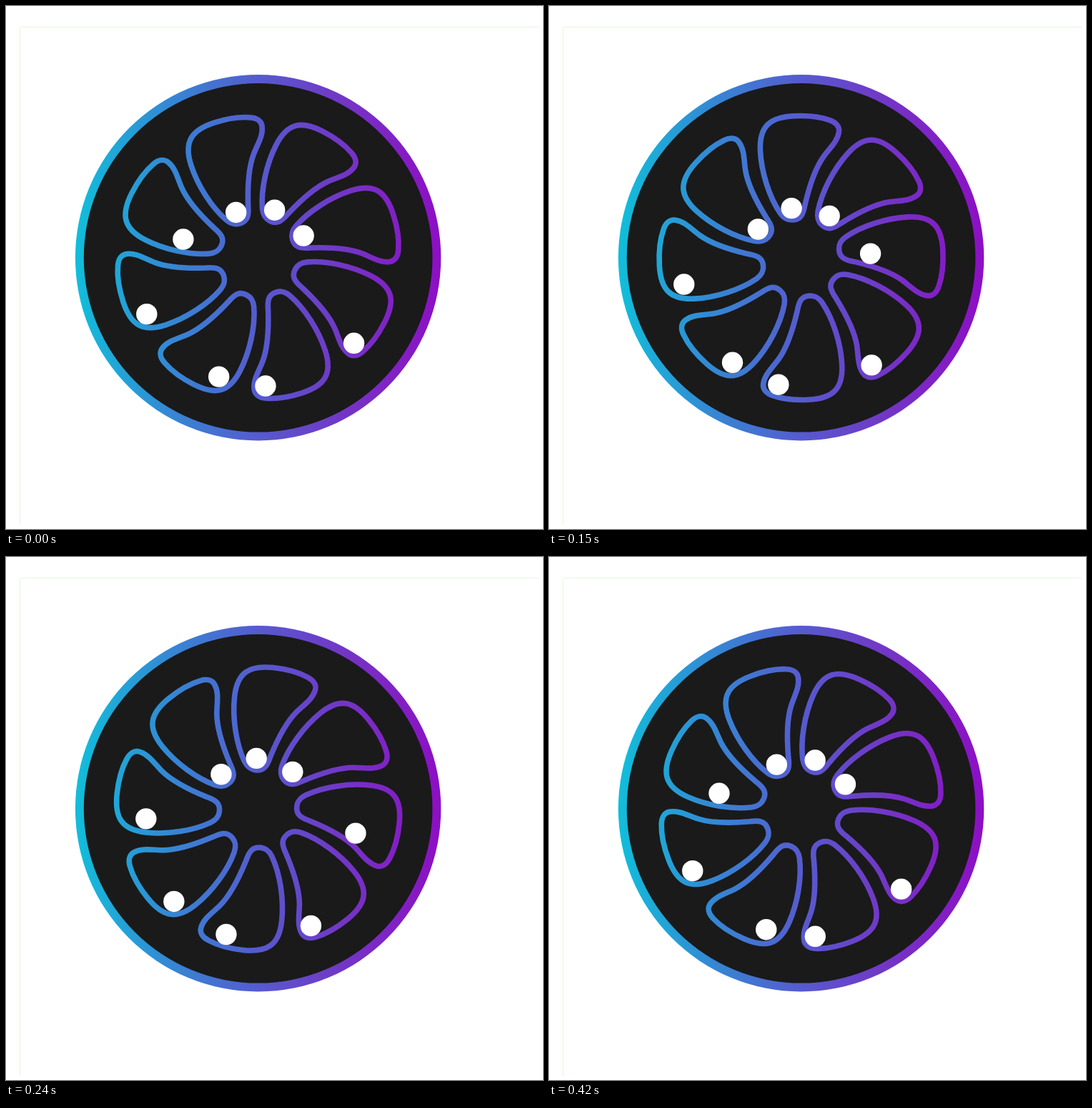
Animation, 751 px wide and 731 px high, one loop 0.45 s. Source, as an HTML page with a canvas:

```html
<!DOCTYPE html>
<html lang="en">
<head>
<meta charset="utf-8">
<title>Wheel</title>
<style>
  html, body { margin: 0; width: 100%; height: 100%; overflow: hidden; background: #fff; }
  canvas { display: block; }
</style>
</head>
<body>
<canvas id="stage" width="751" height="731"></canvas>
<script>
const ctx = document.getElementById('stage').getContext('2d');
const CX = 352.6, CY = 352;
const STEP_MS = 30, STEPS = 15, POCKETS = 8, DEG_PER_STEP = 3;

const gradient = ctx.createLinearGradient(103, 0, 602, 0);
['#12bcda', '#3488d4', '#565bce', '#7434c6', '#8c10c4']
  .forEach((color, i) => gradient.addColorStop(i / 4, color));

// Upright pocket, relative to the wheel centre
const pocket = new Path2D(`M-49.2 -152
  C-49.2 -187 -33 -198.5 0 -198.5 C20 -198.5 38 -195 50 -190
  C59 -186.5 63.5 -180 62 -173 C59.5 -160 48 -151 39 -140
  C26 -124 16 -97 9.3 -74 C6 -60 2 -53.5 -9 -53.5
  C-17 -53.5 -21.5 -57 -26 -64 C-40 -87 -49.2 -122 -49.2 -152Z`);

// Places in the upright pocket where a ball comes to rest
const TIP = [-9.8, -70], CORNER = [45.5, -173.5], BULGE = [-26.5, -173];

// As its pocket turns, a ball rolls from one resting place to the next
const rolls = [
  { start: 0, end: 12, from: TIP, bend: [8, -133], to: CORNER, lag: 1.35 },
  { start: 30, end: 45, from: CORNER, bend: [10, -188], to: BULGE, lag: 1.7 },
  { start: 56, end: 81, from: BULGE, bend: [-40, -128], to: TIP, lag: 1.7 }
];

function ballInPocket(step) {
  const { start, end, from, bend, to, lag } = rolls.findLast(roll => step >= roll.start);
  const u = Math.min(1, (step - start) / (end - start)) ** lag;
  const t = u * u * (3 - 2 * u);
  return [0, 1].map(k => (1 - t) ** 2 * from[k] + 2 * t * (1 - t) * bend[k] + t * t * to[k]);
}

function disc(x, y, r, fill) {
  ctx.beginPath();
  ctx.arc(x, y, r, 0, 2 * Math.PI);
  ctx.fillStyle = fill;
  ctx.fill();
}

function draw(step) {
  ctx.fillStyle = '#fff';
  ctx.fillRect(0, 0, 751, 731);

  ctx.beginPath();
  ctx.moveTo(19.5, 725);
  ctx.arcTo(19.5, 29.5, 745, 29.5, 2);
  ctx.lineTo(745, 29.5);
  ctx.strokeStyle = '#e6f4e1';
  ctx.lineWidth = 1;
  ctx.stroke();

  disc(CX, 351.8, 255.7, gradient);
  disc(CX, 351.8, 243.8, '#1a1a1a');

  // Only the outlines turn; the gradient stays fixed to the stage
  const outlines = new Path2D(), balls = [];
  for (let i = 0; i < POCKETS; i++) {
    const age = step + STEPS * i;
    const turn = new DOMMatrix().translate(CX, CY).rotate(72 + DEG_PER_STEP * age);
    outlines.addPath(pocket, turn);
    balls.push(turn.transformPoint(new DOMPoint(...ballInPocket(age))));
  }
  ctx.strokeStyle = gradient;
  ctx.lineWidth = 7.6;
  ctx.stroke(outlines);
  for (const { x, y } of balls) disc(x, y, 14.7, '#fff');
}

const start = performance.now();
function tick() {
  draw(Math.floor((performance.now() - start) / STEP_MS) % STEPS);
  requestAnimationFrame(tick);
}
tick();
</script>
</body>
</html>
```
